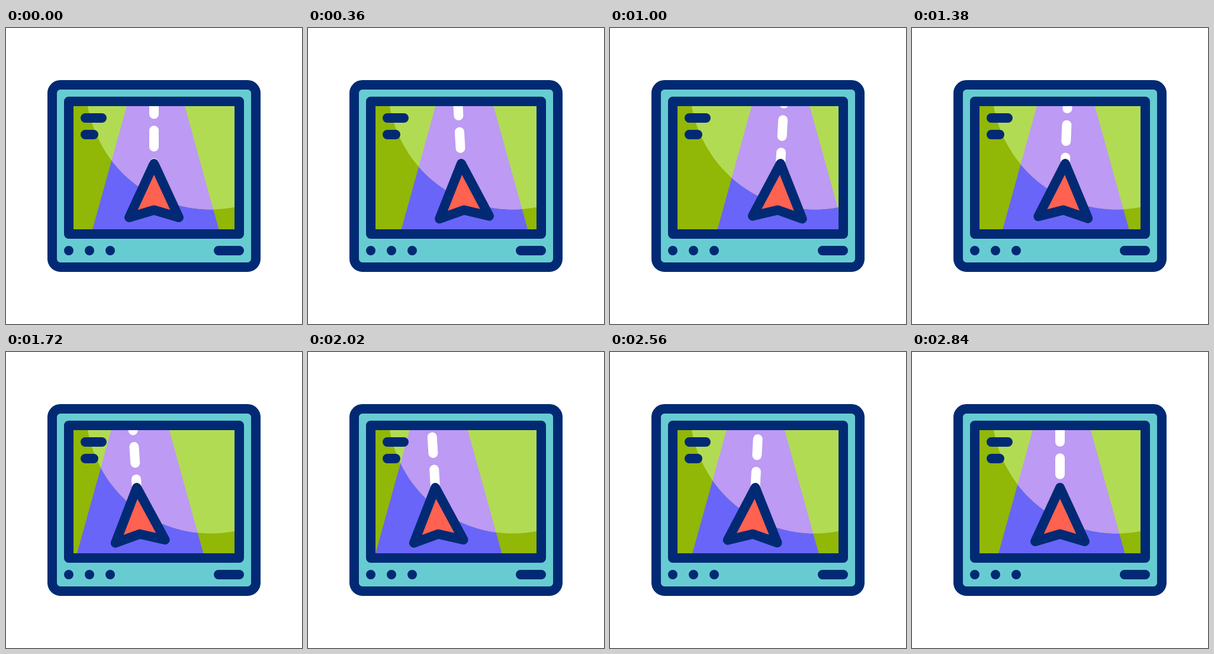
Animation of 500x500 px, one loop 3600 ms. Source, as an HTML page:

```html
<!DOCTYPE html>
<html>
<head>
<meta charset="utf-8">
<style>
  html, body { margin: 0; width: 100%; height: 100%; overflow: hidden; background: #fff; }
  svg { display: block; width: 100vw; height: 100vh; }
  .line { stroke: #022a74; stroke-width: 16; stroke-linecap: round; stroke-linejoin: round; fill: none; }
</style>
</head>
<body>
<svg viewBox="0 0 500 500">
  <defs>
    <clipPath id="screen"><rect x="110" y="128" width="280" height="216"/></clipPath>
    <clipPath id="glare"><circle cx="346" cy="95.3" r="211.2"/></clipPath>
    <path id="lane" d="M204.9 128H300.9L360.6 344H145.1Z"/>
  </defs>
  <rect class="line" x="78" y="96" width="344" height="308" rx="14" style="fill:#67ccd1"/>
  <g clip-path="url(#screen)">
    <rect x="110" y="128" width="280" height="216" fill="#91b707"/>
    <use class="road" href="#lane" fill="#6965f9"/>
    <g clip-path="url(#glare)">
      <rect x="110" y="128" width="280" height="216" fill="#b2db54"/>
      <use class="road" href="#lane" fill="#bd9af3"/>
    </g>
    <g id="car">
      <path id="dashes" d="M250 8V255" stroke="#fff" stroke-width="16" stroke-linecap="round" stroke-dasharray="27.5"/>
      <path class="line" d="M250 229L292 320L250 307.5L208 320Z" style="fill:#ff6250"/>
    </g>
  </g>
  <path class="line" d="M106 124H394V348H106ZM134 152H162M134 180H148M359 376H394M106 376h0M141 376h0M176 376h0"/>
</svg>
<script>
  const LOOP = 3600, MOVE = 2840, STEP = 20;
  const DASH = 55, SPEED = 16 * DASH / (MOVE - STEP); // px per ms

  // Turning points as [time in ms, value]
  const sway = [[0, 0], [940, 36], [1920, -33], [MOVE, 0]];
  const tilt = [[0, 0], [560, -4.5], [1140, 4.5], [1860, -4.5], [2560, 3], [MOVE, 0]];

  // Sine ease from each turning point to the next
  function swing(points, t) {
    const i = points.findIndex(p => p[0] >= t) || 1;
    const [t0, a] = points[i - 1], [t1, b] = points[i];
    return a + (b - a) * (1 - Math.cos(Math.PI * (t - t0) / (t1 - t0))) / 2;
  }

  const roads = document.querySelectorAll(".road");
  const car = document.getElementById("car");
  const dashes = document.getElementById("dashes");

  function draw(now) {
    const t = Math.min(Math.floor(now % LOOP / STEP) * STEP, MOVE);
    const x = swing(sway, t);
    roads.forEach(road => road.setAttribute("transform", `translate(${x})`));
    car.setAttribute("transform", `translate(${x}) rotate(${swing(tilt, t)} 250 275)`);
    dashes.setAttribute("stroke-dashoffset", -(t * SPEED % DASH));
    requestAnimationFrame(draw);
  }
  draw(performance.now());
</script>
</body>
</html>
```
